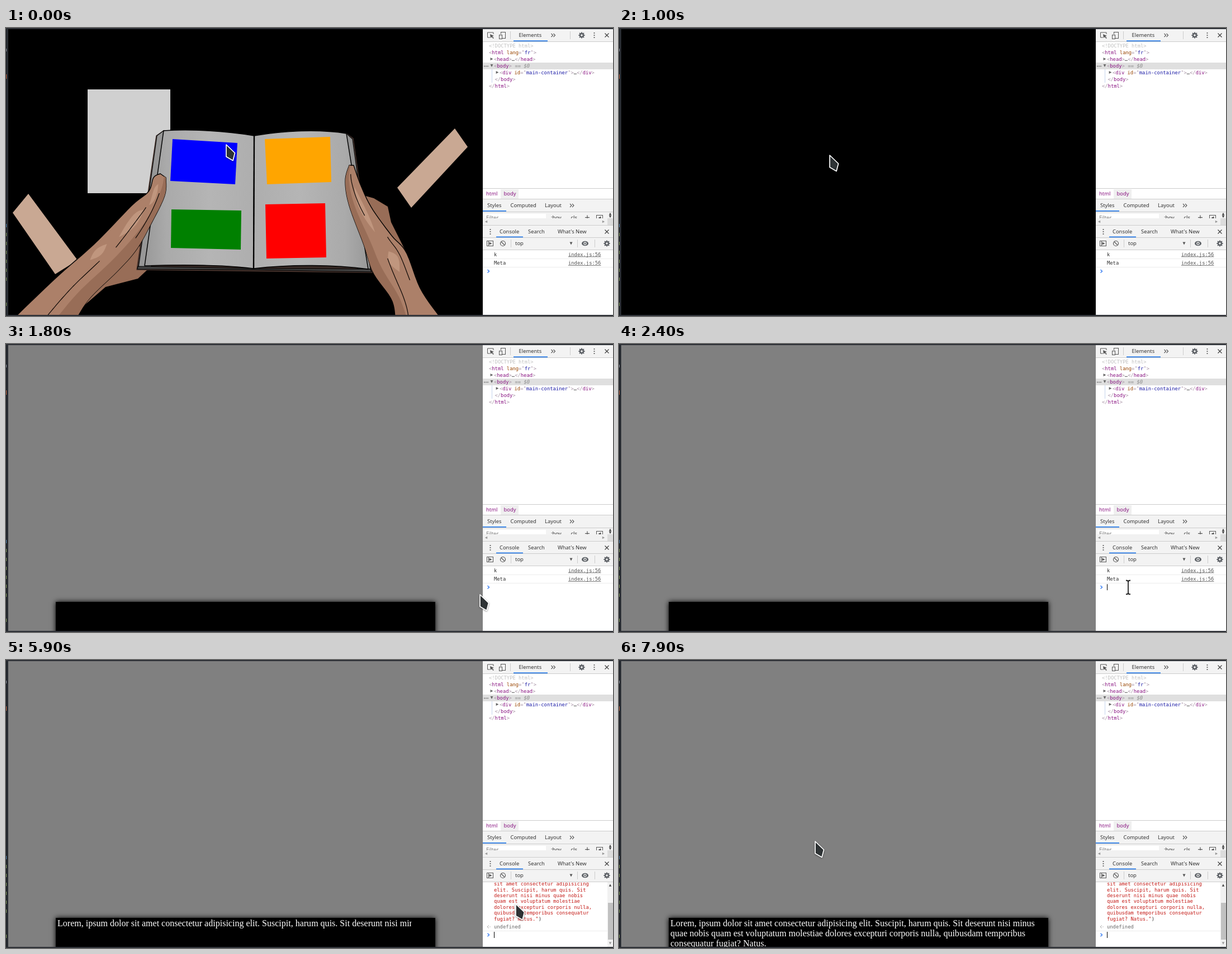
Animation of 1086x516 px, one loop 8000 ms. Source, as an HTML page with a canvas:

```html
<!DOCTYPE html>
<html lang="en">
<head>
<meta charset="utf-8">
<title>Dialogue box demo</title>
<style>
html, body { margin: 0; width: 100%; height: 100%; overflow: hidden; background: #000; }
canvas { display: block; }
</style>
</head>
<body>
<canvas id="stage" width="1086" height="516"></canvas>
<script>
const ctx = document.getElementById('stage').getContext('2d');
const LOOP = 8000, TICK = 100;
const MONO = '8.82px "DejaVu Sans Mono", monospace';
const SANS = '9.4px "Noto Sans", sans-serif';
const SERIF = '16.04px "Liberation Serif", serif';
const CHAR = 5.31;
const BLACKOUT = 1000, DIALOGUE = 1200, BEAM = 2100, SUBMIT = 4800;

// pointer moves: [first tick, last tick, x, y]
const MOVES = [
  [0, 0, 394, 209], [100, 100, 388, 218], [600, 700, 377, 228], [1600, 1800, 848, 449], [BEAM, 2200, 911, 436],
  [SUBMIT, SUBMIT, 912, 437], [7100, 7100, 709, 348], [7500, 7500, 470, 261], [7900, 7900, 351, 325]
];
const CARET_TOGGLES = [2400, 5000, 5900, 7100, 7900];
// [time, letters revealed]
const TYPING = [[0, 0], [SUBMIT, .7], [5000, 12], [5900, 100.5], [6600, 146], [6800, 196], [7100, 198], [7500, 206], [7900, 224]];
const SPEECH = [
  'Lorem, ipsum dolor sit amet consectetur adipisicing elit. Suscipit, harum quis. Sit deserunt nisi minus',
  'quae nobis quam est voluptatum molestiae dolores excepturi corporis nulla, quibusdam temporibus',
  'consequatur fugiat? Natus.'
];
const LOG = ['sit amet consectetur adipisicing', 'elit. Suscipit, harum quis. Sit', 'deserunt nisi minus quae nobis',
  'quam est voluptatum molestiae', 'dolores excepturi corporis nulla,', 'quibusdam temporibus consequatur', 'fugiat? Natus."'];

const mix = (a, b, s) => a + (b - a) * s;
const clamp = (v, lo, hi) => Math.max(lo, Math.min(hi, v));

function pointer(t) {
  let x = 0, y = 0;
  for (const [first, last, toX, toY] of MOVES) {
    const s = clamp((t - first + TICK) / (last - first + TICK), 0, 1);
    x = mix(x, toX, s);
    y = mix(y, toY, s);
  }
  return [x, y];
}

const caretOn = t => CARET_TOGGLES.filter(k => k <= t).length % 2 === 1;

function rect(x0, y0, x1, y1, color) {
  ctx.fillStyle = color;
  ctx.fillRect(x0, y0, x1 - x0, y1 - y0);
}

function clipped(x0, y0, x1, y1, draw) {
  ctx.save();
  ctx.beginPath();
  ctx.rect(x0, y0, x1 - x0, y1 - y0);
  ctx.clip();
  draw();
  ctx.restore();
}

function text(s, x, y, color = '#333', font = SANS) {
  ctx.font = font;
  ctx.fillStyle = color;
  ctx.fillText(s, x, y + 3.2);
}

function paint(fill, stroke, width = 1.4) {
  if (fill) { ctx.fillStyle = fill; ctx.fill(); }
  if (stroke) { ctx.strokeStyle = stroke; ctx.lineWidth = width; ctx.stroke(); }
}

function poly(p, fill, stroke, width, open) {
  ctx.beginPath();
  for (let i = 0; i < p.length; i += 2) ctx.lineTo(p[i], p[i + 1]);
  if (!open) ctx.closePath();
  paint(fill, stroke, width);
}

const line = (p, color = '#555', width = 1) => poly(p, null, color, width, true);

function circle(x, y, r, fill, stroke, width) {
  ctx.beginPath();
  ctx.arc(x, y, r, 0, 7);
  paint(fill, stroke, width);
}

// point at u (0..1) on a smooth curve through the rail's points
function along(rail, u) {
  const last = rail.length / 2 - 1;
  const i = Math.min(Math.floor(u * last), last - 1), s = u * last - i;
  return [0, 1].map(axis => {
    const [a, b, c, d] = [-1, 0, 1, 2].map(k => rail[2 * clamp(i + k, 0, last) + axis]);
    return b + s / 2 * (c - a + s * (2 * a - 5 * b + 4 * c - d + s * (3 * (b - c) + d - a)));
  });
}

// an arm is the surface between two rails: u runs along it, v across it
function surface([a, b], u, v) {
  const p = along(a, u), q = along(b, u);
  return [mix(p[0], q[0], v), mix(p[1], q[1], v)];
}

const SAMPLES = Array.from({ length: 41 }, (_, i) => i / 40);

function band(arm, fill, stroke, v0 = 0, v1 = 1) {
  const side = v => SAMPLES.map(u => surface(arm, u, v));
  poly([...side(v0), ...side(v1).reverse()].flat(), fill, stroke);
}

function shine(arm, u0, u1, v, width) {
  const side = dir => SAMPLES.map(s => surface(arm, mix(u0, u1, s), v + dir * width * Math.sin(Math.PI * s)));
  poly([...side(-1), ...side(1).reverse()].flat(), '#c0967e');
}

function crease(arm, u0, u1, v0, v1) {
  line(SAMPLES.map(s => surface(arm, mix(u0, u1, s), mix(v0, v1, s))).flat(), '#0c0705', 1.2);
}

const SKIN = '#ac8069', SHADE = '#986d57', CARD = '#c9a893';
const LEFT_ARM = [
  [14, 520, 90, 447, 160, 385, 225, 318, 255, 293, 264, 268, 276, 261],
  [126, 520, 150, 484, 203, 432, 234, 396, 260, 350, 284, 300, 286, 268]
];
const RIGHT_ARM = [
  [697, 520, 690, 486, 657, 438, 640, 388, 614, 318, 607, 274, 614, 246],
  [778, 520, 742, 468, 716, 402, 690, 372, 654, 322, 634, 280, 622, 246]
];

function book() {
  poly([269, 193, 282, 184, 444, 194, 609, 189, 621, 198, 655, 438, 234, 433], '#352824', '#4a352e', 1.5);
  poly([270, 193, 282, 184, 260, 429, 237, 429], '#979797', '#111', 1.3);
  poly([609, 189, 620, 199, 652, 432, 630, 432], '#929292', '#111', 1.3);
  poly([236, 427, 443, 431, 652, 432, 654, 437, 443, 433, 235, 432], '#444', '#000', 1.2);
  // a page bulges between the spine and its outer edge
  const page = (top, bottom, topY, bottomY) => {
    const tone = ctx.createLinearGradient(444, 0, bottom, 0);
    tone.addColorStop(0, '#aeaeae');
    tone.addColorStop(.4, '#b5b5b5');
    tone.addColorStop(.8, '#aaa');
    tone.addColorStop(1, '#999');
    ctx.beginPath();
    ctx.moveTo(444, 193);
    ctx.bezierCurveTo(mix(444, top, .33), 184, mix(444, top, .7), 181, top, topY);
    ctx.lineTo(bottom, bottomY);
    ctx.bezierCurveTo(mix(443, bottom, .7), 424, mix(443, bottom, .33), 423, 443, 431);
    ctx.closePath();
    paint(tone, '#000', 1.5);
  };
  page(282, 248, 184, 426);
  page(609, 648, 189, 432);
  line([444, 193, 443, 432], '#000', 2.4);
  poly([298, 199, 414, 206, 410, 280, 294, 274], '#00f');
  poly([463, 199, 580, 195, 582, 276, 467, 280], '#ffa500');
  poly([296, 325, 421, 327, 420, 397, 295, 394], '#008000');
  poly([464, 316, 571, 314, 573, 411, 466, 413], '#f00');
}

function bookScene(dx, dy) {
  ctx.save();
  ctx.translate(dx, dy);
  ctx.lineJoin = 'round';
  rect(146, 110, 294, 296, '#d0d0d0');
  poly([40, 297, 12, 331, 88, 441, 128, 416], CARD);
  poly([803, 180, 826, 213, 725, 322, 700, 286], CARD);
  // palms and fingers under the cover
  poly([240, 390, 252, 434, 236, 449, 178, 464, 140, 497, 180, 430], SHADE);
  poly([640, 300, 658, 305, 683, 320, 689, 348, 716, 402, 690, 400], SHADE);
  book();

  band(LEFT_ARM, SKIN, '#000');
  band(LEFT_ARM, SHADE, null, .68, 1);
  shine(LEFT_ARM, .28, .36, .25, .1);
  shine(LEFT_ARM, .41, .6, .36, .13);
  shine(LEFT_ARM, .66, .84, .4, .14);
  crease(LEFT_ARM, .02, .3, .5, .45);
  crease(LEFT_ARM, .38, .62, .5, .35);
  crease(LEFT_ARM, .5, .8, .75, .65);

  band(RIGHT_ARM, SKIN, '#000');
  band(RIGHT_ARM, SHADE, null, 0, .25);
  shine(RIGHT_ARM, .27, .4, .62, .13);
  shine(RIGHT_ARM, .54, .8, .55, .14);
  crease(RIGHT_ARM, .03, .36, .3, .5);
  crease(RIGHT_ARM, .22, .5, .8, .85);
  crease(RIGHT_ARM, .62, .9, .5, .4);
  ctx.restore();
}

function dialogue(t) {
  rect(4, 2, 853, 514, '#808080');
  ctx.save();
  ctx.shadowColor = '#000';
  ctx.shadowBlur = 9;
  rect(89, 462, 768, 530, '#000');
  ctx.restore();
  let letters = TYPING.filter(k => k[0] <= t).pop()[1];
  ctx.font = SERIF;
  SPEECH.forEach((s, i) => {
    const shown = clamp(letters, 0, s.length), whole = Math.floor(shown);
    const width = n => ctx.measureText(s.slice(0, n)).width;
    const edge = 92 + mix(width(whole), width(whole + 1), shown - whole);
    clipped(89, 462, edge, 514, () => text(s, 92, 473.3 + i * 18.45, '#fff', SERIF));
    letters -= s.length;
  });
}

// runs of [string, colour] in the fixed-width font
function code(x, y, ...runs) {
  for (const [s, color] of runs) {
    text(s, x, y, color, MONO);
    x += s.length * CHAR;
  }
}

const bracket = s => [s, '#a894a6'];
const tag = s => [s, '#881280'];
const attr = s => [s, '#994500'];
const value = s => [s, '#1a1aa6'];
const dark = s => [s, '#303030'];

function triangle(x, y, r, dir, color = '#666') {
  const dx = Math.cos(dir * Math.PI / 2) * r, dy = Math.sin(dir * Math.PI / 2) * r;
  poly([x + dx, y + dy, x - dx - dy, y - dy + dx, x - dx + dy, y - dy - dx], color);
}

function frameBox(x, y, w, h) {
  ctx.strokeStyle = '#555';
  ctx.lineWidth = 1;
  ctx.strokeRect(x + .5, y + .5, w, h);
}

function gear(x, y) {
  for (let a = 0; a < 6; a += Math.PI / 4) {
    line([x, y, x + 5.6 * Math.cos(a), y + 5.6 * Math.sin(a)], '#5f6368', 2);
  }
  circle(x, y, 4.2, '#5f6368');
  circle(x, y, 1.7, '#f3f3f3');
}

function dots(x, y) {
  for (const d of [-4, 0, 4]) circle(x, y + d, 1.1, '#555');
}

function cross(x, y) {
  for (const d of [-3.5, 3.5]) line([x - 3.5, y - d, x + 3.5, y + d], '#444', 1.2);
}

function chevrons(x, y) {
  for (const d of [0, 4]) line([x - 4 + d, y - 3, x - 1 + d, y, x - 4 + d, y + 3], '#555', 1.1);
}

function bar(y0, y1) {
  rect(853, y0, 1086, y1, '#f3f3f3');
  rect(853, y1 - 1, 1086, y1, '#ccc');
}

const underline = (x0, x1, y) => rect(x0, y, x1, y + 1.6, '#1a73e8');

function elementsPanel() {
  bar(2, 25);
  line([872, 11, 872, 8, 861.5, 8, 861.5, 17, 866, 17]);
  poly([866, 11, 873, 14, 870, 15, 873, 18, 871.5, 19, 869, 16, 867, 18], '#555');
  frameBox(885, 7, 8, 11);
  rect(882, 11, 888, 19, '#f3f3f3');
  frameBox(882, 12, 5, 7);
  rect(902, 6, 903, 20, '#ccc');
  text('Elements', 917.5, 13);
  underline(908, 969, 22.4);
  chevrons(979.5, 13);
  rect(1009, 6, 1010, 20, '#ccc');
  gear(1030, 13);
  dots(1052.5, 13);
  cross(1075, 13);

  rect(853, 62, 1086, 74, '#dfdfdf');
  rect(869, 74, 870, 98, '#c5d5ee');
  code(864, 31.5, ['<!DOCTYPE html>', '#c0c0c0']);
  code(864, 43.5, bracket('<'), tag('html '), attr('lang'), bracket('="'), value('fr'), bracket('">'));
  code(873, 55.5, bracket('<'), tag('head'), bracket('>'), dark('…'), bracket('</'), tag('head'), bracket('>'));
  code(873, 67.5, bracket('<'), tag('body'), bracket('>'));
  text('== $0', 910.5, 67.5, '#888', 'italic ' + MONO);
  code(883, 79.5, bracket('<'), tag('div '), attr('id'), bracket('="'), value('main-container'), bracket('">'),
    dark('…'), bracket('</'), tag('div'), bracket('>'));
  code(874.5, 91.5, bracket('</'), tag('body'), bracket('>'));
  code(864, 103.5, bracket('</'), tag('html'), bracket('>'));
  triangle(869, 55.5, 2.4, 0);
  triangle(869, 67.5, 2.4, 1);
  triangle(879, 79.5, 2.4, 0);
  for (const x of [856, 859, 862]) circle(x, 68.5, .9, '#666');

  rect(853, 287, 1086, 288, '#ccc');
  rect(885, 289, 917, 306, '#efefef');
  text('html', 859, 297, '#881280');
  text('body', 890.5, 297, '#881280');
}

function stylesPanel() {
  rect(853, 306, 1086, 307, '#ccc');
  bar(307, 330);
  text('Styles', 861, 318);
  text('Computed', 902.5, 318);
  text('Layout', 964, 318);
  chevrons(1013, 318);
  underline(853, 895, 327);
  clipped(853, 330, 1086, 341, () => {
    rect(853, 330, 1086, 341, '#f3f3f3');
    rect(856, 333, 966, 345, '#fff');
    text('Filter', 859, 340, '#777');
    text(':hov', 975, 340);
    text('.cls', 1008, 340);
    line([1036, 339.5, 1044, 339.5], '#555', 1.2);
    line([1040, 335.5, 1040, 343], '#555', 1.2);
    frameBox(1056, 335, 11, 9);
    triangle(1062, 340, 2.5, 2, '#555');
    rect(1076, 330, 1086, 341, '#f1f1f1');
    triangle(1081, 333, 2.2, 3, '#444');
    triangle(1081, 338, 2.2, 1, '#444');
  });
  rect(853, 341, 1086, 353, '#f1f1f1');
  rect(1076, 341, 1086, 353, '#dcdcdc');
  triangle(859, 347, 2.2, 2, '#999');
  triangle(1069, 347, 2.2, 0, '#999');
}

function consoleBars() {
  rect(853, 353, 1086, 354, '#ccc');
  bar(354, 376);
  dots(866.5, 365);
  text('Console', 883, 365);
  text('Search', 934, 365);
  text("What's New", 987, 365);
  cross(1075, 365);
  underline(877, 925, 373.6);
  bar(376, 398);
  frameBox(860, 381, 11, 9);
  rect(863, 382, 864, 391, '#555');
  triangle(867, 386, 2.5, 0, '#555');
  circle(889, 386, 4.5, null, '#555', 1.2);
  line([886, 383, 892, 389], '#555', 1.2);
  for (const x of [903, 1022, 1053]) rect(x, 379, x + 1, 393, '#ccc');
  text('top', 911, 386);
  triangle(1011, 386, 2.5, 1, '#555');
  ctx.beginPath();
  ctx.ellipse(1036, 386, 6, 4.3, 0, 0, 7);
  paint('#5f6368');
  circle(1036, 386, 2.7, '#f3f3f3');
  circle(1036, 386, 1.5, '#5f6368');
  gear(1075, 386);
}

function prompt(y, caret) {
  line([861.5, y - 2.8, 864.5, y, 861.5, y + 2.8], '#367cf1', 1.4);
  if (caret) rect(873, y - 5.5, 874, y + 5.5, '#000');
}

function consoleOutput(t) {
  if (t < SUBMIT) {
    ['k', 'Meta'].forEach((s, i) => {
      const y = 405.5 + i * 15.5;
      code(873, y, dark(s));
      code(1006, y, ['index.js:56', '#545454']);
      rect(1006, y + 4, 1064.5, y + 4.8, '#545454');
      rect(853, 413 + i * 15, 1086, 414 + i * 15, '#ececec');
    });
    prompt(435.7, caretOn(t));
    return;
  }
  LOG.forEach((s, i) => code(873, 401 + i * 10.4, [s, '#c41a16']));
  code(873 + CHAR * LOG[6].length, 463.4, dark(')'));
  line([864, 475.5, 861, 478, 864, 480.5], '#aaa');
  circle(866, 478, .7, '#aaa');
  code(873, 478, ['undefined', '#666']);
  rect(853, 485, 1076, 486, '#ececec');
  prompt(492.5, caretOn(t));
  rect(1076, 398, 1086, 514, '#f1f1f1');
  rect(1077, 435, 1086, 501, '#c1c1c1');
  triangle(1081, 403.5, 2.2, 3, '#444');
  triangle(1081, 507.5, 2.2, 1, '#999');
}

function editorEdge() {
  rect(0, 0, 1086, 516, '#2d3036');
  rect(0, 2, 2, 514, '#1f2329');
  rect(0, 37, 1, 42, '#8a919c');
  rect(0, 83, 1, 91, '#c8663f');
  for (let y = 351; y < 450; y += 16) rect(0, y, 1, y + 6, y > 351 ? '#7f9a55' : '#4f86b5');
  rect(0, 492, 1, 498, '#7f9a55');
}

function cursor(beam, x, y) {
  ctx.save();
  ctx.lineJoin = 'round';
  if (beam) {
    for (const [color, width] of [['#fff', 4], ['#222', 1.8]]) {
      for (const d of [-1, 1]) {
        line([x - 4, y + d * 12.5, x - 1, y + d * 12, x, y + d * 10, x + 1, y + d * 12, x + 4, y + d * 12.5], color, width);
      }
      line([x, y - 11, x, y + 11], color, width);
    }
  } else {
    ctx.shadowColor = 'rgba(0,0,0,.35)';
    ctx.shadowBlur = 3;
    ctx.shadowOffsetY = 1;
    poly([x, y, x + 15.5, y + 15, x + 12, y + 28.5, x, y + 21.5], '#2f3436', '#fff', 1.7);
  }
  ctx.restore();
}

function frame(now) {
  const t = Math.floor(now % LOOP / TICK) * TICK;
  const [x, y] = pointer(t);
  editorEdge();
  clipped(4, 2, 853, 514, () => {
    rect(4, 2, 853, 514, '#000');
    // the scene drifts against the pointer
    if (t < BLACKOUT) bookScene(Math.max(0, 388 - x) * .18, Math.min(0, 218 - y) * .3);
    else if (t >= DIALOGUE) dialogue(t);
  });
  clipped(853, 2, 1086, 514, () => {
    rect(853, 2, 1086, 514, '#fff');
    elementsPanel();
    stylesPanel();
    consoleOutput(t);
    consoleBars();
  });
  cursor(t >= BEAM && t < SUBMIT, x, y);
}

const start = performance.now();
function tick() {
  frame(performance.now() - start);
  requestAnimationFrame(tick);
}
tick();
</script>
</body>
</html>
```
